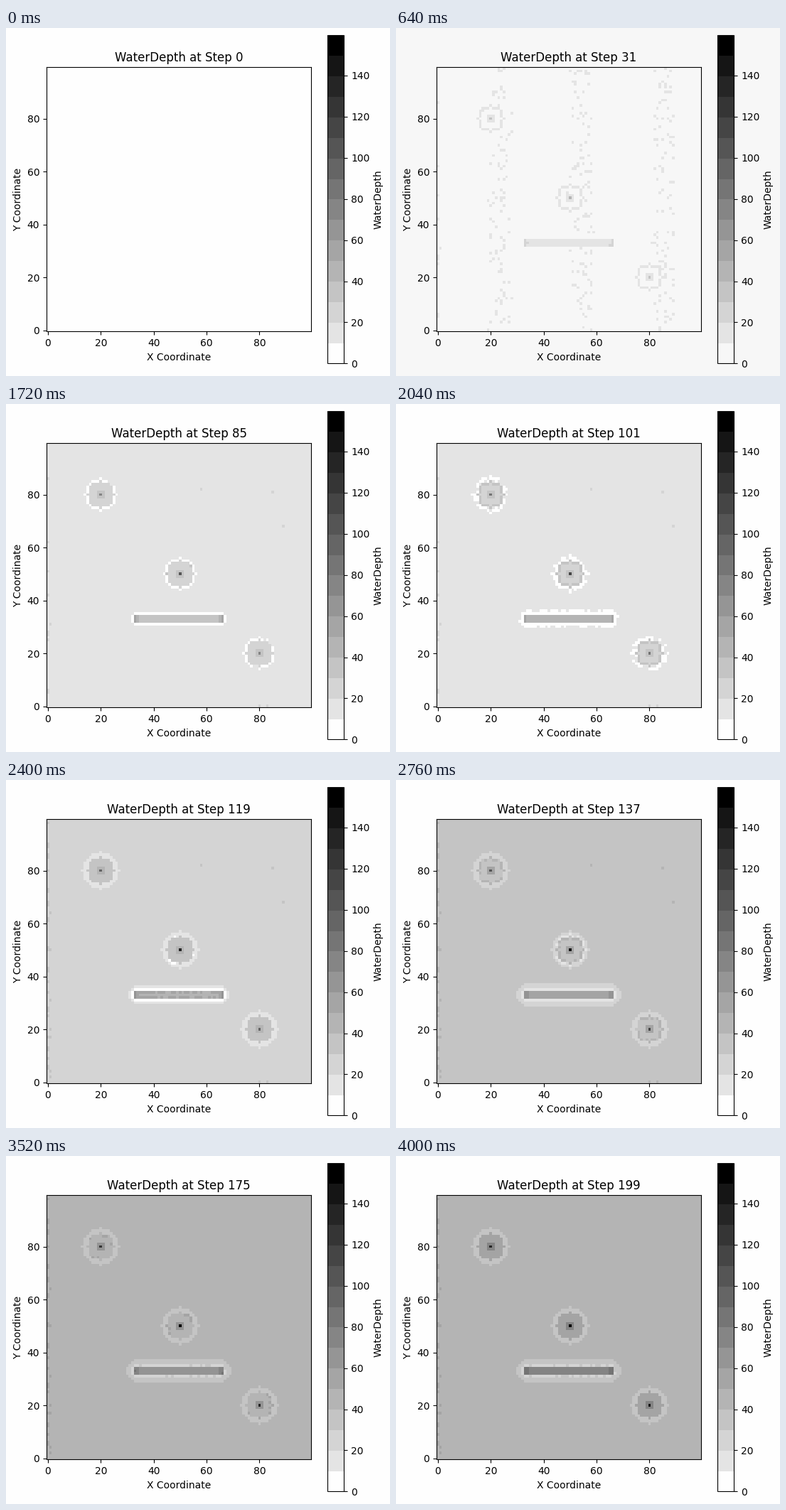
Animation, 540 px wide and 490 px high, one loop 4040 ms. Source, as a matplotlib script:

```python
import numpy as np
import matplotlib.pyplot as plt
from matplotlib.animation import FuncAnimation
from matplotlib.colors import ListedColormap

W, H, N = 540, 490, 100
FRAMES, INTERVAL = 101, 40
LAST_STEP = 199
VMAX, BINS = 159.5, 16

rng = np.random.default_rng(7)
yy, xx = np.mgrid[:N, :N]
grain = rng.uniform(-1, 1, (N, N))
luck = rng.random((N, N))

basins = []     # (mask, peak, power): fills as peak * t ** power
rims = []       # (mask, drop, start): sinks below the plain from a step on


def grow(mask):
    """Mask widened by one cell in the four main directions."""
    out = mask.copy()
    out[1:] |= mask[:-1]
    out[:-1] |= mask[1:]
    out[:, 1:] |= mask[:, :-1]
    out[:, :-1] |= mask[:, 1:]
    return out


def add_rims(body, drops):
    """Drained rings around a body, each one starting later."""
    for n, drop in enumerate(drops):
        wider = grow(body)
        rims.append((wider & ~body, drop, 31 + 45 * n))
        body = wider


def pond(cx, cy, peak, drop):
    dx, dy = xx - cx, yy - cy
    d2 = dx**2 + dy**2
    disc = d2 <= 25
    add_rims(disc, (drop, .9))
    basins.extend([
        (disc, 5.4, .75),
        (~grow(~disc), 5.5, 1),
        ((abs(dx) <= 1) & (abs(dy) <= 1), 7.5, 1),
        (d2 == 0, peak, .8),
    ])


def trench(x0, x1, y0, y1):
    body = (xx >= x0) & (xx <= x1) & (yy >= y0) & (yy <= y1)
    to_end = np.minimum(xx - x0, x1 - xx)
    add_rims(body, (1.65, .9, .9))
    basins.extend([
        (body, 7.6, .8),
        (body & (yy == (y0 + y1) // 2), 7.3, .8),
        (body & (to_end == 1), 8.3, .8),
        (body & (to_end == 0), 8.6, .6),
    ])


pond(20, 80, 14, .9)
pond(50, 50, 20, 1.15)
pond(80, 20, 15, .9)
trench(33, 66, 32, 34)

puddles = np.zeros((N, N), bool)
for px, py in [(58, 82), (85, 81), (89, 68), (80, 0), (83, 0)]:
    puddles[py, px] = True


def smooth(u):
    u = np.clip(u, 0, 1)
    return u * u * (3 - 2 * u)


def plain(step):
    """Mean level of the open ground: two showers with a pause between."""
    return np.interp(step, [0, 50, 111, 155, 165, LAST_STEP],
                     [0, 1.5, 1.9, 4.05, 4.5, 4.6])


def wet_cells(step):
    share = .3 if step > 113 else .15
    edge = ((xx == 0) & (luck < share)) | ((xx == 1) & (luck < share / 2))
    if 85 <= step < 150:
        return edge | puddles
    return edge & (29 <= step < 55 or step >= 85)


def depth(step):
    t = step / LAST_STEP
    rough = .15 * min(1, step / 31) * grain
    stripes = np.cos(2 * np.pi * (xx - 8) / 31)
    ground = plain(step) + .05 * grain - .035 * stripes
    level = ground.copy()
    for mask, drop, start in rims:
        sunk = ground + rough - drop * smooth((step - start) / 28)
        level[mask] = np.minimum(ground, sunk)[mask]
    for mask, peak, power in basins:
        level[mask] = (peak * t**power + rough)[mask]
    level = np.floor(np.clip(level, 0, BINS - 1)) + wet_cells(step)
    return (level + .5) * VMAX / BINS


# The lowest bin is clear, so it takes the colour of the page.
shades = np.ones((BINS, 4))
shades[:, :3] = (244 - 15.9 * np.arange(BINS)[:, None]) / 255
shades[-1, :3] = 0
shades[0, 3] = 0

fig = plt.figure(figsize=(W / 100, H / 100), dpi=100)


def panel(left, top, width, height):
    return fig.add_axes([left / W, 1 - (top + height) / H,
                         width / W, height / H], facecolor="none")


LEFT, TOP = 57, 10.4
ax = panel(LEFT, TOP + 45, 372, 372)
cax = panel(LEFT + 395.25, TOP, 23.1, 462)
im = ax.imshow(depth(0), cmap=ListedColormap(shades), vmin=0, vmax=VMAX,
               origin="lower", interpolation="nearest", aspect="auto")
fig.colorbar(im, cax=cax, label="WaterDepth")
ax.set_xlabel("X Coordinate")
ax.set_ylabel("Y Coordinate")
ax.set_xticks(range(0, N, 20))
ax.set_yticks(range(0, N, 20))
title = ax.set_title("")


def update(i):
    step = max(0, 2 * i - 1)
    fig.set_facecolor("#f7f7f7" if 0 < plain(step) < 1 else "#fefefe")
    im.set_data(depth(step))
    title.set_text(f"WaterDepth at Step {step}")
    return im, title


anim = FuncAnimation(fig, update, frames=FRAMES, interval=INTERVAL,
                     repeat=True, repeat_delay=0, blit=False)
plt.show()
```
